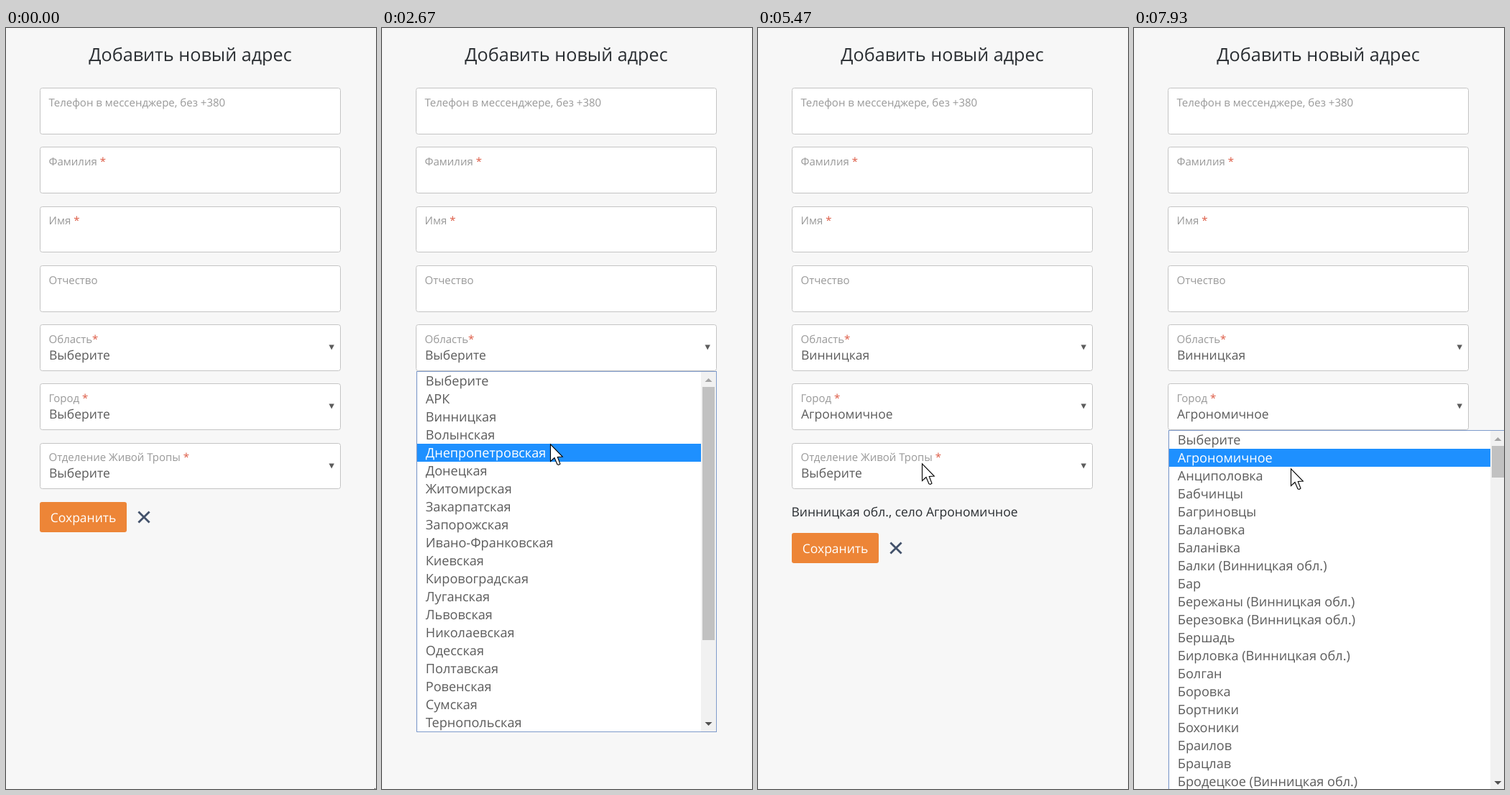
Write an HTML page with a canvas that moves like this. It is 515 px wide and 1058 px high and loops after 8000 ms.

```html
<!DOCTYPE html>
<html lang="ru">
<head>
<meta charset="utf-8">
<title>Добавить новый адрес</title>
<style>
  html, body { margin: 0; width: 100%; height: 100%; overflow: hidden; background: #f7f7f7; }
  canvas { display: block; }
</style>
</head>
<body>
<canvas id="stage" width="515" height="1058"></canvas>
<script>
const ctx = document.getElementById('stage').getContext('2d');
const LOOP = 8000, FPS = 15;
const LEFT = 47, WIDTH = 419, PITCH = 82.25, ROW = 25, BAR = 21;
const BACK = '#f7f7f7', DARK = '#2a2e32', GREY = '#5c5c5c', ORANGE = '#ed8537';

const REGIONS = ['Выберите', 'АРК', 'Винницкая', 'Волынская', 'Днепропетровская', 'Донецкая',
  'Житомирская', 'Закарпатская', 'Запорожская', 'Ивано-Франковская', 'Киевская',
  'Кировоградская', 'Луганская', 'Львовская', 'Николаевская', 'Одесская', 'Полтавская',
  'Ровенская', 'Сумская', 'Тернопольская'];
const CITIES = ['Выберите', 'Агрономичное', 'Анциполовка', 'Бабчинцы', 'Багриновцы', 'Балановка',
  'Баланівка', 'Балки (Винницкая обл.)', 'Бар', 'Бережаны (Винницкая обл.)',
  'Березовка (Винницкая обл.)', 'Бершадь', 'Бирловка (Винницкая обл.)', 'Болган', 'Боровка',
  'Бортники', 'Бохоники', 'Браилов', 'Брацлав', 'Бродецкое (Винницкая обл.)'];
const BRANCHES = ['Выберите', 'Отделение №1: ул. Жолушина, 4'];

// Times are in ticks: a list opens at each of "opens" and closes at "closes",
// where the choice is made; the address line follows at "listed".
// "total" counts all rows of a scrolling list.
const FIELDS = [
  { label: 'Телефон в мессенджере, без +380' },
  { label: 'Фамилия', mark: ' *' },
  { label: 'Имя', mark: ' *' },
  { label: 'Отчество' },
  { label: 'Область', mark: '*', options: REGIONS, choice: 2, total: 26, width: WIDTH,
    opens: [20], closes: 51, listed: 53, part: 'Винницкая обл.' },
  { label: 'Город', mark: ' *', options: CITIES, choice: 1, total: 208, width: 471,
    opens: [63, 115], closes: 77, listed: 78, part: 'село Агрономичное' },
  { label: 'Отделение Живой Тропы', mark: ' *', options: BRANCHES, choice: 1, width: WIDTH,
    opens: [88], closes: 100, listed: 101, part: BRANCHES[1] }
];

// Pointer moves: first tick, last tick, destination.
const ENTRY = [513, 1057];
const MOVES = [
  [2, 14, 228, 422], [14, 17, 228, 450],
  [25, 29, 225, 521], [29, 34, 234, 597], [38, 47, 235, 532],
  [66, 71, 228, 591], [72, 73, 228, 594], [80, 85, 228, 615],
  [88, 97, 222, 677], [100, 104, 221, 645], [104, 112, 220, 540], [114, 119, 218, 612]
];

function pointerAt(tick) {
  let [x, y] = ENTRY;
  for (const [from, to, toX, toY] of MOVES) {
    const left = Math.min(1, Math.max(0, (to - tick) / (to - from)));
    const eased = 1 - left ** 1.4;
    x += (toX - x) * eased;
    y += (toY - y) * eased;
  }
  return [Math.round(x), Math.round(y)];
}

function rect(x, y, w, h, color) {
  ctx.fillStyle = color;
  ctx.fillRect(x, y, w, h);
}

function box(x, y, w, h, fill, stroke) {
  ctx.beginPath();
  ctx.roundRect(x, y, w, h, 3);
  paint(fill, stroke, 1);
}

function polygon(points, fill, stroke) {
  ctx.beginPath();
  points.forEach(([x, y]) => ctx.lineTo(x, y));
  ctx.closePath();
  paint(fill, stroke, 1.1);
}

function paint(fill, stroke, lineWidth) {
  ctx.fillStyle = fill;
  ctx.fill();
  if (!stroke) return;
  ctx.strokeStyle = stroke;
  ctx.lineWidth = lineWidth;
  ctx.stroke();
}

// triangle with its base at y and its tip at y + h
function triangle(cx, y, half, h, color) {
  polygon([[cx - half, y], [cx + half, y], [cx, y + h]], color);
}

function setFont(size) {
  ctx.font = `${size}px "Open Sans", sans-serif`;
}

function text(str, x, y, size, color, align = 'left') {
  setFont(size);
  ctx.textAlign = align;
  ctx.fillStyle = color;
  ctx.fillText(str, x, y);
  return ctx.measureText(str).width;
}

function wrap(str, size, maxWidth) {
  setFont(size);
  const lines = [];
  for (const word of str.split(' ')) {
    const longer = lines.length ? `${lines[lines.length - 1]} ${word}` : word;
    if (lines.length && ctx.measureText(longer).width <= maxWidth) lines[lines.length - 1] = longer;
    else lines.push(word);
  }
  return lines;
}

const fieldBottom = i => Math.round(147.9 + PITCH * i);
const chosen = (field, tick) => tick >= field.closes ? field.choice : 0;

function drawField(field, i, tick) {
  const top = Math.round(83 + PITCH * i);
  const base = Math.round(108.9 + PITCH * i);
  box(LEFT + .5, top + .5, WIDTH - 1, fieldBottom(i) - top - 1, '#fff', '#c4c4c4');
  const width = text(field.label, 59.5, base, 15, '#999');
  if (field.mark) text(field.mark, 59.5 + width, base, 15, '#dd5b45');
  if (!field.options) return;
  text(field.options[chosen(field, tick)], 60, base + 23, 17.5, GREY);
  triangle(453.2, top + 28.5, 3.7, 7, GREY);
}

function drawFooter(tick) {
  const address = FIELDS.filter(f => tick >= f.listed).map(f => f.part).join(', ');
  const lines = address ? wrap(address, 17.5, WIDTH + 3) : [];
  lines.forEach((line, i) => text(line, 46.5, 679 + 26 * i, 17.5, DARK));

  const y = lines.length ? 676 + 26 * lines.length : 659;
  box(LEFT, y, 121, 42, ORANGE);
  text('Сохранить', LEFT + 60.5, y + 28, 17.5, '#fff', 'center');

  ctx.beginPath();
  for (const s of [-1, 1]) {
    ctx.moveTo(192 - 7.6, y + 21 - 7.6 * s);
    ctx.lineTo(192 + 7.6, y + 21 + 7.6 * s);
  }
  ctx.strokeStyle = '#43526b';
  ctx.lineWidth = 2.8;
  ctx.stroke();
}

function drawList({ options, total, width }, top, selected, pointerY) {
  const x = LEFT + 2, first = top + 1, height = options.length * ROW, end = first + height;
  const right = LEFT + width - 1, barX = total ? right - BAR : right;
  rect(LEFT, first, 1, height, '#e4e8f0');
  rect(x - 1, top, width - 1, height + 2, '#7f9bcb');
  rect(x, first, right - x, height, '#fff');

  const hovered = Math.floor((pointerY - first) / ROW);
  const active = hovered < 0 ? selected : hovered;
  options.forEach((option, i) => {
    const y = first + i * ROW;
    if (i === active) rect(x, y, barX - x, ROW, '#1e90ff');
    text(option, 60.8, y + 19, 18.1, i === active ? '#fff' : GREY);
  });

  if (!total) return;
  const thumb = Math.round((height - 2 * BAR) * options.length / total);
  rect(barX, first, BAR, height, '#f1f1f1');
  rect(barX + 2, first + BAR, BAR - 4, thumb, '#c1c1c1');
  triangle(barX + BAR / 2, first + 14, 5, -5, '#a3a3a3');
  triangle(barX + BAR / 2, end - 13, 5, 5, '#505050');
}

const ARROW = [[.5, .8], [.5, 24.5], [6, 19.5], [10, 28.8], [12, 29.5], [14, 28],
  [10.3, 18.5], [17.3, 18]];

function draw(tick) {
  ctx.textRendering = 'geometricPrecision';
  rect(0, 0, 515, 1058, BACK);
  text('Добавить новый адрес', LEFT + WIDTH / 2, 46, 25.2, DARK, 'center');
  FIELDS.forEach((field, i) => drawField(field, i, tick));
  drawFooter(tick);

  // the highlight trails the pointer by one tick
  const trailY = pointerAt(tick - 1)[1];
  FIELDS.forEach((field, i) => {
    const isOpen = field.opens?.some(t => tick >= t && (tick < field.closes || t > field.closes));
    if (isOpen) drawList(field, fieldBottom(i), chosen(field, tick), trailY);
  });

  const [px, py] = pointerAt(tick);
  polygon(ARROW.map(([x, y]) => [px + x, py + y]), '#fff', '#000');
}

const start = performance.now();
function loop() {
  const time = (performance.now() - start) % LOOP;
  // the picture advances in whole ticks
  const tick = Math.floor((time + 5) * FPS / 1000);
  draw(Math.min(tick, LOOP * FPS / 1000 - 1));
  requestAnimationFrame(loop);
}
loop();
</script>
</body>
</html>
```
